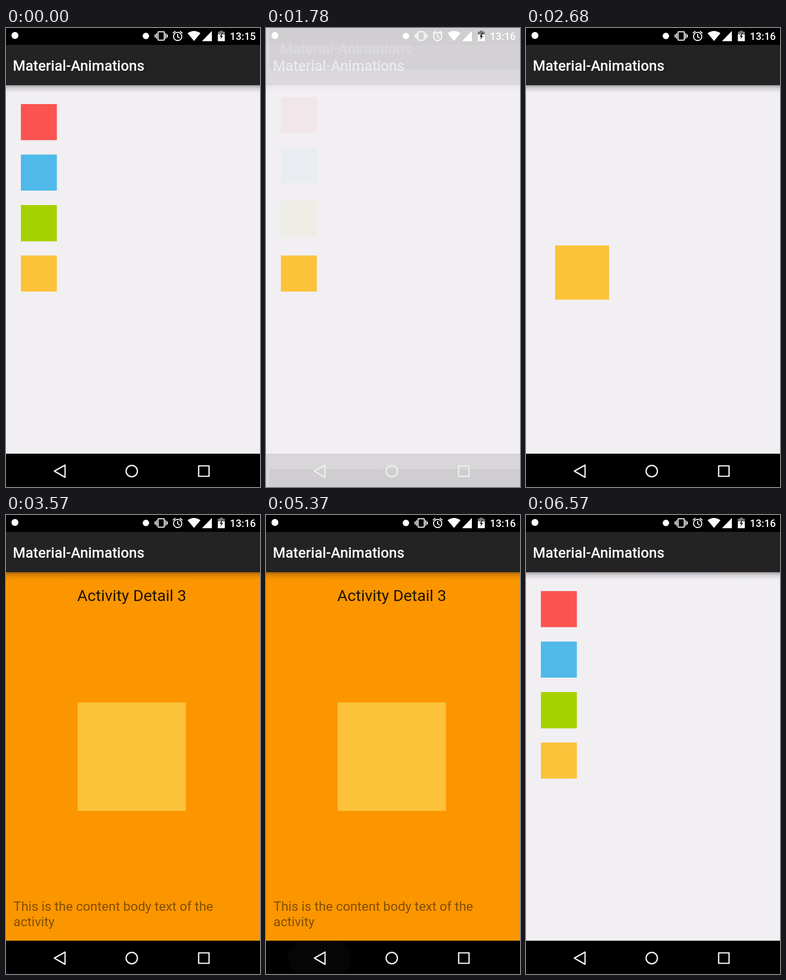
These frames come from a looping animation (512x923 px, 7770 ms). An HTML page:

```html
<!DOCTYPE html>
<html lang="en">
<head>
<meta charset="utf-8">
<title>Material-Animations</title>
<style>
  html, body { margin: 0; width: 100%; height: 100%; overflow: hidden; background: #f1eff2; }
  svg { display: block; width: 100vw; height: 100vh; }
  text { font-family: Roboto, "Open Sans", sans-serif; }
  .bar { font-weight: 500; fill: #fff; }
  .line { fill: none; stroke: #fff; stroke-width: 2; }
  .nav { fill: none; stroke: #eee; stroke-width: 2.7; stroke-linejoin: round; }
</style>
</head>
<body>
<svg viewBox="0 0 512 923" preserveAspectRatio="none">
  <defs>
    <linearGradient id="shade" x1="0" y1="0" x2="0" y2="1">
      <stop offset="0" stop-color="#1c1020" stop-opacity=".36"/>
      <stop offset=".4" stop-color="#1c1020" stop-opacity=".13"/>
      <stop offset="1" stop-color="#1c1020" stop-opacity="0"/>
    </linearGradient>
    <radialGradient id="glow">
      <stop offset="0" stop-color="#d0cfdc" stop-opacity=".95"/>
      <stop offset=".65" stop-color="#a9a8b4" stop-opacity=".85"/>
      <stop offset="1" stop-color="#8e8d9c" stop-opacity=".5"/>
    </radialGradient>
    <clipPath id="reveal"><circle id="hole" cx="253.5" cy="485.5" r="0"/></clipPath>
    <clipPath id="navClip"><rect y="856" width="512" height="67"/></clipPath>
    <g id="head">
      <rect y="115" width="512" height="15" fill="url(#shade)"/>
      <rect width="512" height="34"/>
      <rect y="34" width="512" height="81" fill="#232323"/>
    </g>
    <text id="title" class="bar" x="13.8" y="86" font-size="29.1">Material-Animations</text>
    <rect id="foot" y="856" width="512" height="67"/>
  </defs>

  <rect width="512" height="923" fill="#f1eff2"/>

  <g id="old">
    <use href="#head" data-move="7,-33"/>
    <use href="#title" data-move="15,-34"/>
    <use href="#foot" data-move="7,31"/>
  </g>

  <g id="tiles">
    <rect x="30" y="153" width="72.5" height="72.5" fill="#fb5450" data-move="0,-14"/>
    <rect x="30" y="254.5" width="72.5" height="72.5" fill="#4fb9e9" data-move="0,-15"/>
    <rect x="30" y="356" width="72.5" height="73" fill="#a6d100" data-move="0,-9"/>
  </g>

  <g id="detail" clip-path="url(#reveal)">
    <rect y="115" width="512" height="742" fill="#fb9600"/>
    <text x="253.5" y="172.5" font-size="32" text-anchor="middle" fill-opacity=".87">Activity Detail 3</text>
    <g font-size="26.2" fill-opacity=".48">
      <text x="15" y="796">This is the content body text of the</text>
      <text x="15" y="826.5">activity</text>
    </g>
  </g>

  <g id="chrome">
    <use href="#head"/>
    <use href="#title"/>
    <use href="#foot"/>
  </g>

  <rect id="hero" fill="#fcc23a"/>

  <g id="status" fill="#fff">
    <circle cx="18" cy="15" r="7"/>
    <circle cx="282" cy="16" r="6.5"/>
    <rect class="line" x="306.5" y="7.5" width="12.5" height="17" rx="1"/>
    <path class="line" d="M303.5 10.5v11M300.5 13v6M322 10.5v11M325 13v6"/>
    <circle class="line" cx="346" cy="17" r="8.3"/>
    <path class="line" d="M346 12v5.5l4 2.6M336.5 10.5l5-4.2M355.500 10.500l-5-4.200"/>
    <path d="M379 26L366 10.500Q379 1.500 392 10.500Z"/>
    <path d="M395 26.500H415V6Z"/>
    <path d="M431 5.500h6v2h4v6h-14v-6h4Z" fill="#777"/>
    <path d="M427 13h14v13.500h-14Z"/>
    <path d="M435.500 10.500l-5 7h3.200l-1.700 6 5.500-7.500h-3.400l2.900-5.500Z" fill="#111"/>
    <text id="clock" class="bar" x="451.300" y="24" font-size="20.600">13:15</text>
  </g>

  <rect id="press" x="44" y="855" width="128" height="72" rx="36" fill="#fff" clip-path="url(#navClip)"/>
  <g class="nav">
    <path d="M97.500 891L119 879V903.500Z"/>
    <circle cx="253.500" cy="891" r="11.400"/>
    <rect x="388.300" y="880.500" width="21" height="21"/>
  </g>
  <circle id="touch" r="16.500" fill="url(#glow)"/>
</svg>

<script>
const LOOP = 7770;
const STEPS = [0, 1050, 1350, 1500, 1650, 1780, 1930, 2080, 2230, 2380, 2530, 2680, 2830, 2980,
  3270, 3420, 3570, 5070, 5220, 5370, 5520, 5670, 5820, 6270, 6420, 6570];
const SMALL = [30, 457.5, 72.5], LARGE = [144.5, 377, 218], RADIUS = 512;

const $ = id => document.getElementById(id);
const set = (el, attrs) => { for (const k in attrs) el.setAttribute(k, attrs[k]); };
const span = (t, from, to) => Math.min(1, Math.max(0, (t - from) / (to - from)));
const swing = p => (1 - Math.cos(Math.PI * p)) / 2;

// cubic-bezier(.4, 0, .2, 1), solved by bisection
function glide(p) {
  let lo = 0, hi = 1, s = 0.5;
  for (let i = 0; i < 24; i++) {
    s = (lo + hi) / 2;
    const x = 1.2 * s * (1 - s) ** 2 + 0.6 * s * s * (1 - s) + s ** 3;
    if (x < p) lo = s; else hi = s;
  }
  return s * s * (3 - 2 * s);
}

const movers = [...document.querySelectorAll("[data-move]")].map(el => ({
  el, by: el.dataset.move.split(",").map(Number)
}));

function draw(t) {
  const leaving = t >= 1350 && t < 2380;
  const fade = 1 - span(t, 1330, 1800);
  const burst = leaving ? ((t - 1330) / 450) ** 2 : 0;
  for (const { el, by } of movers)
    set(el, { transform: `translate(${by[0] * burst} ${by[1] * burst})` });

  set($("old"), { opacity: leaving ? fade : 0 });
  set($("tiles"), { opacity: t < 5316 ? fade : 1 });
  set($("chrome"), { opacity: t < 1350 ? 1 : span(t, 1713, 2380) });

  const grow = glide(span(t, 2577, 2980)) - glide(span(t, 6167, 6570));
  const [x, y, size] = SMALL.map((v, i) => v + (LARGE[i] - v) * grow);
  set($("hero"), { x, y, width: size, height: size });

  const open = swing(span(t, 3040, 3640)) - swing(span(t, 5316, 5916));
  set($("hole"), { r: RADIUS * Math.max(0, open) });
  set($("detail"), { opacity: 1 - span(t, 5485, 5785) });

  set($("press"), { opacity: t < 5070 ? 0 : 0.23 * (1 - span(t, 5070, 5400)) });
  const tap = t >= 1050 && t < 1350, back = t >= 5070 && t < 5220;
  set($("touch"), { cx: tap ? 66 : 107, cy: tap ? 507 : 899, opacity: tap || back ? 0.75 : 0 });
  $("clock").textContent = t < 1350 ? "13:15" : "13:16";
}

const start = performance.now();
let shown = -1;
function tick() {
  const now = (performance.now() - start) % LOOP;
  const t = STEPS.findLast(s => s <= now);
  if (t !== shown) draw(shown = t);
  requestAnimationFrame(tick);
}
tick();
</script>
</body>
</html>
```
